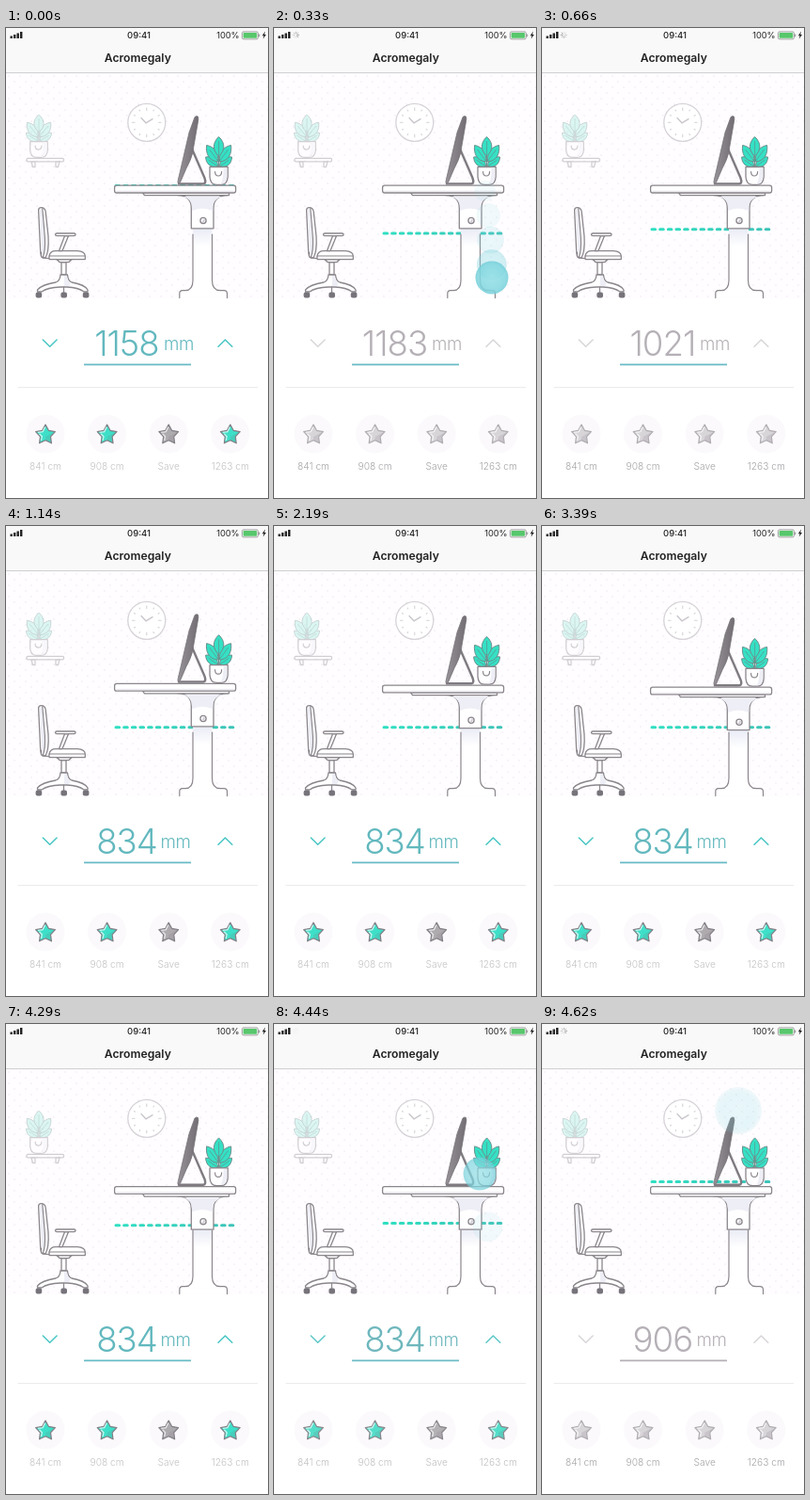
Recreate the animation shown at these times as an HTML page. Size 279 by 499 pixels, loop 4650 ms.

```html
<!DOCTYPE html>
<html lang="en">
<head>
<meta charset="utf-8">
<title>Desk height</title>
<style>
html, body { margin: 0; width: 100%; height: 100%; overflow: hidden; background: #fff; }
svg { display: block; width: 100vw; height: 100vh; font-family: Inter, Roboto, sans-serif; }
.ink { fill: #fff; stroke: #8b868c; stroke-width: 1.3; stroke-linejoin: round; stroke-linecap: round; }
.line { fill: none; stroke: #8b868c; stroke-width: 1.2; stroke-linecap: round; stroke-linejoin: round; }
.leaf { fill: var(--leaf, #35e0c4); stroke: #6b8f8d; stroke-width: 1; stroke-linejoin: round; }
.vein { fill: none; stroke: #5b9a94; stroke-width: .8; }
.shade { fill: #eeeef6; }
</style>
</head>
<body>
<svg viewBox="0 0 279 499" preserveAspectRatio="none">
  <defs>
    <pattern id="dots" width="12" height="12" patternUnits="userSpaceOnUse">
      <circle cx="3" cy="3" r="1.1" fill="#f6f2f7"/>
      <circle cx="9" cy="9" r="1.1" fill="#f6f2f7"/>
    </pattern>
    <linearGradient id="screen" x1="0" x2="1">
      <stop offset="0" stop-color="#969298"/><stop offset="1" stop-color="#716d73"/>
    </linearGradient>
    <linearGradient id="mark" gradientUnits="userSpaceOnUse" x1="115" x2="243" y1="0" y2="0">
      <stop offset="0" stop-color="#2fe0c2"/><stop offset="1" stop-color="#3dc3b8"/>
    </linearGradient>
    <linearGradient id="under" x1="0" x2="0" y1="0" y2="1">
      <stop offset="0" stop-color="#e9ebf5"/><stop offset="1" stop-color="#fff"/>
    </linearGradient>
    <radialGradient id="touch">
      <stop offset="0" stop-color="#93dfe6"/><stop offset=".8" stop-color="#80d6df"/><stop offset="1" stop-color="#72cdd8"/>
    </radialGradient>
    <g id="plant">
      <path class="line" d="M0-20V-36"/>
      <path class="leaf" d="M-1-20C-9-18-13.5-23-14-30C-7-31-1-28-1-20Z"/>
      <path class="leaf" d="M1-20C9-18 13.5-23 14-30C7-31 1-28 1-20Z"/>
      <path class="leaf" d="M-1-25C-11-26-14-34-13-42.5C-5-41 0-35-1-25Z"/>
      <path class="leaf" d="M1-25C11-26 14-34 13-42.5C5-41 0-35 1-25Z"/>
      <path class="leaf" d="M0-31C-7-37-7-45 0-51.5C7-45 7-37 0-31Z"/>
      <path class="vein" d="M0-47V-21M-10-38L-1-26M10-38L1-26M-11-27L-1-20M11-27L1-20"/>
      <path class="ink" d="M-9.6-19.5H9.6V-9Q9-.7 2.5-.7H-2.5Q-9-.7-9.6-9Z"/>
      <path class="shade" d="M5-18.5H8.6V-9Q8-1.6 2-1.6Q5-6 5-18.5Z"/>
      <path class="line" d="M-4-14.5C-4-8.5 3-8.5 3-14.5" stroke-width=".9"/>
    </g>
    <path id="star"/>
  </defs>

  <rect width="279" height="499" fill="#fff"/>
  <rect y="48" width="279" height="239" fill="#fffdff"/>
  <rect y="48" width="279" height="239" fill="url(#dots)"/>
  <rect width="279" height="48" fill="#f9f9f9"/>
  <path d="M0 47.6H279" stroke="#c9c8ca" stroke-width=".9"/>

  <g fill="#222">
    <path d="M4.5 8.5h2.4V11H4.5zM8 7h2.4v4H8zM11.5 5.5h2.4V11h-2.4zM15 4h2.4v7H15z"/>
    <text x="141.5" y="11.2" font-size="9.5" font-weight="500" text-anchor="middle">09:41</text>
    <text x="248.5" y="11.2" font-size="9.2" text-anchor="end">100%</text>
    <path d="M276 3.6L272.8 8.2H274.6L273.8 11.6L277 7H275.2Z"/>
    <text x="140.3" y="36" font-size="12.2" font-weight="600" text-anchor="middle">Acromegaly</text>
  </g>
  <rect x="251.4" y="3.9" width="17" height="8" rx="1.6" fill="none" stroke="#8b8b8b" stroke-width=".8"/>
  <rect x="252.6" y="5.1" width="14.6" height="5.6" rx=".7" fill="#57c76c"/>
  <path d="M269.7 6.5v2.8" stroke="#8b8b8b"/>
  <g id="spin" stroke="#888" stroke-width=".9" stroke-linecap="round"></g>

  <!-- wall -->
  <g opacity=".38" style="--leaf: #a2ecde">
    <use href="#plant" transform="translate(35 138) scale(.97 .89)"/>
    <rect class="ink" x="22" y="138.4" width="39.5" height="3.4" rx="1.2"/>
    <path class="ink" d="M27 142H31V147.5H28.5ZM53 142H57L55.5 147.5H53Z"/>
  </g>
  <g fill="none" stroke="#d6d2d8" stroke-width="1.3" stroke-linecap="round">
    <circle cx="149.8" cy="100.3" r="20" fill="#fff"/>
    <path id="ticks" stroke-width="1.1"/>
    <path d="M144 95.5L149 100.8L156 96.6" stroke="#c9c5cb"/>
  </g>

  <!-- chair -->
  <g>
    <path class="ink" d="M34.6 193.5Q34.6 190.6 37.5 190.6Q41.5 190.6 42.2 195L45 221Q46 237 42 244H39Q36.8 243 36.6 236Z"/>
    <path class="shade" d="M36 194Q36.5 192 38.3 192.2L41 224Q41.6 236 39.4 242Q38 240 37.9 234Z"/>
    <path class="line" d="M38.8 191.5L41.4 223Q42 236 39.5 243M37.5 238V242.5Q38 244.5 46 244.5"/>
    <path class="ink" d="M46 242Q47 236.6 53 236.6H76Q84 237 84.3 242V245.6H46Z"/>
    <path class="line" d="M46 242H84"/>
    <path class="ink" d="M54 218H72.5Q74 218 74 219.3T72.5 220.6H54Q52.6 220.6 52.6 219.3T54 218Z"/>
    <path class="ink" d="M62.5 220.8H66.5L60 236.6H56.5Z"/>
    <path class="ink" d="M54 245.8H70L67 248.6H57Z"/>
    <path class="ink" d="M59 248.8H64V262H59Z"/>
    <path class="ink" d="M58 262H65.5Q66 268.5 70 270Q84 272.5 87 278V280H83Q77 275.5 65 275H58Q44 275.5 38 280H33.5V278Q38 272.5 53 270Q57.5 268.5 58 262Z"/>
    <path class="shade" d="M62 263H64.8Q65.5 269 69 271L67 274H62Z"/>
    <path class="line" d="M61.5 275V281"/>
    <g fill="#77737a">
      <rect x="31.6" y="280.4" width="6.6" height="6" rx="2"/>
      <rect x="58.4" y="280.4" width="6.6" height="6" rx="2"/>
      <rect x="81.8" y="280.4" width="6.6" height="6" rx="2"/>
    </g>
  </g>

  <path id="level" d="M117 0H241.9" fill="none" stroke="url(#mark)" stroke-width="3" stroke-linecap="round" stroke-dasharray="3.6 5.06"/>

  <!-- desk -->
  <path class="ink" d="M199 205V268Q199 278.5 191 278.7H188Q184.8 278.7 184.8 282V286.6H235.5V282Q235.5 278.7 232 278.7H228Q219.5 278.5 219.5 268V205Z" style="stroke:none"/>
  <g id="desk">
    <rect x="199" y="212" width="20.4" height="20" fill="url(#under)"/>
    <path class="ink" d="M183 177.5Q197.3 178 197.3 191V212.8H221V191Q221 178 236 177.5Z"/>
    <path class="shade" d="M188 179H231Q220.2 181 220.2 191V194Q209 189 198 194V191Q198 181 188 179Z"/>
    <circle class="ink" cx="210" cy="204.4" r="3.1" stroke-width="1"/>
    <path d="M211 202.2A2.4 2.4 0 0 1 208.4 206.2Z" fill="#d2cfd6"/>
    <path class="ink" d="M145.5 175H237.5V177.7H147.5Z"/>
    <rect class="ink" x="115.6" y="167.2" width="129" height="7.8" rx="2.2"/>
    <path d="M117.5 173.2H242.5" stroke="#eeebf1" stroke-width="1.4"/>
    <path d="M197 126L211.4 159Q213.6 165.2 210 165.4H184" fill="none" stroke="#7f7b81" stroke-width="2.4" stroke-linejoin="round" stroke-linecap="round"/>
    <path d="M201 94.6Q203.2 92.8 204.4 94Q205.4 96 204.2 101L198.6 133Q197 140 192 149L185.6 163.8Q184 166 183 164.6Q182.7 163.6 183.4 161L195 111Z" fill="url(#screen)" stroke="#757177" stroke-width=".8"/>
    <use href="#plant" x="226.6" y="167"/>
  </g>
  <path class="line" d="M199 219V268Q199 278.5 191 278.7H188Q184.8 278.7 184.8 282V286.6M219.5 219V268Q219.5 278.5 228 278.7H232Q235.5 278.7 235.5 282V286.6"/>
  <g id="trail" fill="url(#touch)"></g>

  <!-- controls -->
  <g fill="none" stroke-width="1.5" stroke-linecap="round" stroke-linejoin="round" id="arrows">
    <path d="M39.3 331L46.7 338.3L54.1 331"/>
    <path d="M226 338.3L233.4 331L240.8 338.3"/>
  </g>
  <g id="value" font-weight="300">
    <text id="num" x="128.4" y="347.8" font-size="36.6" letter-spacing="-1" text-anchor="middle"></text>
    <text id="unit" y="341.5" font-size="18.8" letter-spacing="-.4">mm</text>
  </g>
  <path id="rule" d="M83 357.4H197" stroke-width="1.6"/>
  <path d="M12.5 381.5H268" stroke="#eceaec" stroke-width="1"/>
  <g id="slots"></g>
</svg>
<script>
const LOOP = 4650;
const $ = id => document.getElementById(id);
const clamp = v => Math.max(0, Math.min(1, v));
const prog = (t, a, b) => clamp((t - a) / (b - a));
const smooth = p => p * p * (3 - 2 * p);
const out = p => 1 - (1 - p) ** 2;
const mix = (a, b, p) => a + (b - a) * p;
const blend = (a, b, p) => `rgb(${a.map((v, i) => Math.round(mix(v, b[i], p)))})`;

const TEAL = [98, 184, 190], ARROW = [72, 198, 196], GREY = [181, 176, 182];
const MINT = [62, 223, 200], STEEL = [174, 171, 175], PALE = [216, 213, 217];
const TOP = 167.4, LOW = 213.7;

function add(parent, tag, attrs) {
  const el = document.createElementNS('http://www.w3.org/2000/svg', tag);
  for (const k in attrs) el.setAttribute(k, attrs[k]);
  parent.appendChild(el);
  return el;
}

const polar = (r, a) => [r * Math.sin(a), -r * Math.cos(a)];
const starPath = 'M' + Array.from({ length: 10 }, (_, i) =>
  polar(i % 2 ? 5.8 : 10.9, i * Math.PI / 5).map(v => v.toFixed(2))).join('L') + 'Z';
$('star').setAttribute('d', starPath);

$('ticks').setAttribute('d', Array.from({ length: 12 }, (_, i) => {
  const a = i * Math.PI / 6, [x, y] = polar(i % 3 ? 14.2 : 12.8, a), [u, v] = polar(15.4, a);
  return `M${149.8 + x} ${100.3 + y}L${149.8 + u} ${100.3 + v}`;
}).join(''));

const spokes = Array.from({ length: 8 }, (_, i) => {
  const [x, y] = polar(1.6, i * Math.PI / 4), [u, v] = polar(3.2, i * Math.PI / 4);
  return add($('spin'), 'path', { d: `M${23.3 + x} ${7.4 + y}L${23.3 + u} ${7.4 + v}` });
});

const slots = ['841 cm', '908 cm', 'Save', '1263 cm'].map((name, i) => {
  const g = add($('slots'), 'g', { transform: `translate(${42 + i * 65.6} 432)` });
  add(g, 'circle', { r: 20.5, cy: -1, fill: '#fbf9fc' });
  const star = add(g, 'use', { href: '#star', 'stroke-width': 1.2, 'stroke-linejoin': 'round' });
  add(g, 'path', { d: 'M-8-2.6L-2.9-3.4L-.4-8.4M-6.5-1.2L-3.6 1.8L-4.6 6', fill: 'none', stroke: '#fff', 'stroke-width': 1.3, opacity: .7 });
  add(g, 'path', { d: 'M0 5.6L6 8.2L4.8 2L9.2-3L0 2Z', fill: '#77737a', opacity: .16 });
  const label = add(g, 'text', { y: 36.5, 'font-size': 10.2, 'text-anchor': 'middle', 'font-weight': 300 });
  label.textContent = name;
  return { star, label, color: name === 'Save' ? STEEL : MINT };
});

const blobs = [4, 3, 2, 1, 0].map(i => ({ lag: i * 32, el: add($('trail'), 'circle', {}), k: i }));

// Finger position for the downward and the upward drag
function finger(t) {
  if (t < 2000) {
    const p = prog(t, 100, 315);
    return [mix(205, 232, out(p)), mix(90, 265, p)];
  }
  const p = out(prog(t, 4400, 4530));
  return [mix(230, 209, p), mix(232, 92, p)];
}

function drawTouch(t) {
  const [start, end, gone] = t < 2000 ? [80, 350, 540] : [4390, 4500, 4640];
  const fade = 1 - prog(t, end, gone);
  for (const { lag, el, k } of blobs) {
    const [x, y] = finger(t - lag);
    const alpha = prog(t - lag, start, start + 60) * fade * (k ? .36 / k : .85);
    el.setAttribute('cx', x);
    el.setAttribute('cy', y);
    el.setAttribute('r', (17.5 - k * 1.6) * (1 + .5 * prog(t, end, gone)));
    el.setAttribute('opacity', alpha);
  }
}

function levelY(t) {
  if (t < 330) return mix(TOP, 218, smooth(prog(t, 110, 325)));
  if (t < 4400) return mix(218, LOW, smooth(prog(t, 350, 500)));
  return mix(LOW, TOP, smooth(prog(t, 4420, 4570)));
}

function height(t) {
  if (t < 350) return mix(1158, 1184, prog(t, 40, 340));
  if (t < 4400) return mix(1184, 834, smooth(prog(t, 350, 1000)));
  return mix(834, 906, prog(t, 4440, 4615));
}

function draw(t) {
  const busy = t < 1000 ? prog(t, 60, 210) : t < 4400 ? 1 - prog(t, 1000, 1120) : prog(t, 4420, 4560);
  const n = Math.round(height(t));

  $('desk').setAttribute('transform', `translate(0 ${5.4 * prog(t, 1050, 4290)})`);
  $('level').setAttribute('transform', `translate(0 ${levelY(t)})`);
  drawTouch(t);

  $('num').textContent = n;
  $('unit').setAttribute('x', n > 999 ? 168 : 164.6);
  $('value').setAttribute('fill', blend(TEAL, GREY, busy));
  $('arrows').setAttribute('stroke', blend(ARROW, PALE, busy));
  $('rule').setAttribute('stroke', blend([104, 188, 198], GREY, prog(t, 4430, 4580)));

  for (const { star, label, color } of slots) {
    star.setAttribute('fill', blend(color, PALE, busy));
    star.setAttribute('stroke', blend([130, 126, 133], [176, 172, 177], busy));
    label.setAttribute('fill', blend([196, 194, 197], [166, 163, 167], busy));
  }

  $('spin').setAttribute('opacity', busy);
  const head = Math.floor(t / 90);
  spokes.forEach((s, i) => s.setAttribute('opacity', 1 - ((head - i) % 8 + 8) % 8 * .11));
}

let began;
function tick(now) {
  began ??= now;
  draw((now - began) % LOOP);
  requestAnimationFrame(tick);
}
draw(0);
requestAnimationFrame(tick);
</script>
</body>
</html>
```
